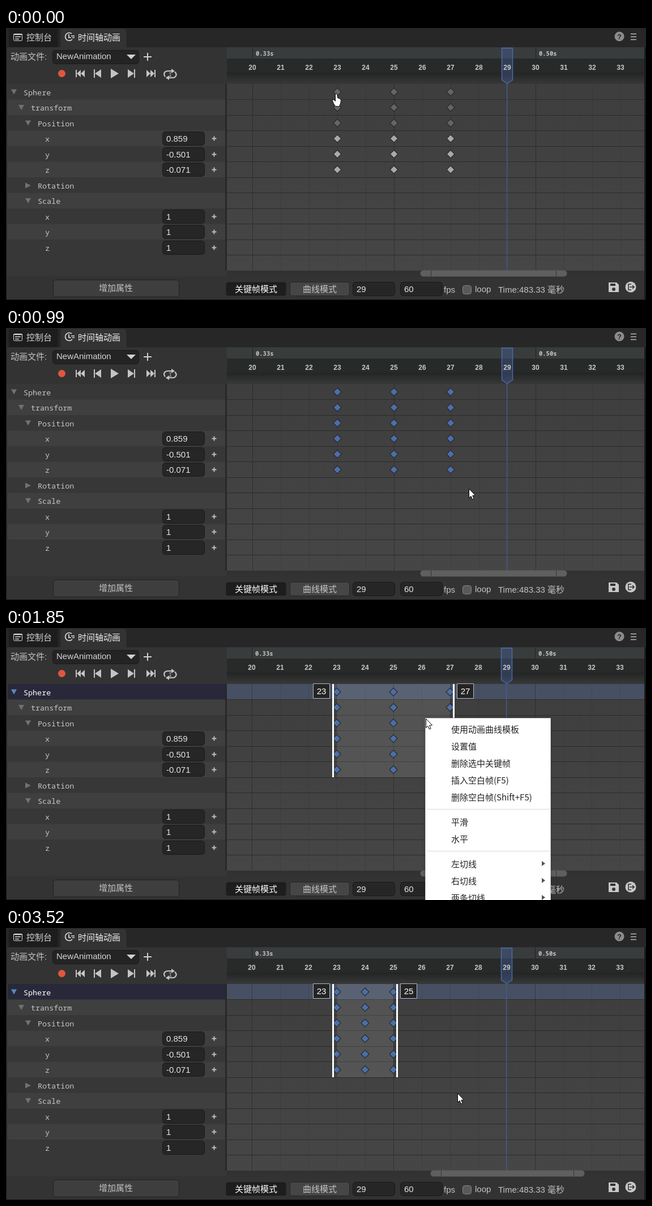
Animation of 1130 by 481 pixels, one loop 4450 ms. Source, as an HTML page with a canvas:

```html
<!DOCTYPE html>
<html lang="zh">
<head>
<meta charset="utf-8">
<title>时间轴动画</title>
<style>
html, body { margin: 0; width: 100%; height: 100%; overflow: hidden; background: #272727; }
canvas { display: block; }
</style>
</head>
<body>
<canvas id="stage" width="1130" height="481"></canvas>
<script>
const ctx = document.getElementById('stage').getContext('2d');
const LOOP = 4450;
const SANS = '"Liberation Sans", "Noto Sans CJK SC", "Noto Sans CJK", sans-serif';
const CJK = '"Noto Sans CJK SC", "Noto Sans CJK", sans-serif';
const MONO = '"Noto Sans Mono", monospace';

const SELECT = 1220, MENU_OPEN = 1850, MENU_CLOSE = 3450, SHORTEN = 3520;
const DRAG_START = 540, DRAG_END = 990;
const ROW = 27.5, TOP = 99;

// [time, x, y] of the pointer tip; it holds each place until the next one
const pointerSteps = [
  [0, 582, 116], [70, 575, 114], [150, 562, 109], [220, 549, 105], [300, 545, 104],
  [540, 553, 109], [620, 598, 139], [700, 670, 188], [770, 735, 231],
  [840, 767, 252], [920, 813, 280], [990, 817, 284],
  [1300, 806, 266], [1380, 776, 218], [1460, 748, 173], [1540, 741, 160],
  [2800, 764, 223], [2880, 774, 243], [2960, 782, 259], [3040, 788, 273],
  [3120, 793, 284], [3200, 796, 290], [3280, 797, 292]
];
// [from, to, opacity]
const clicks = [[460, 990, .55], [1770, 1850, .55], [3370, 3450, .72]];

const rows = [
  ['Sphere', 31, 'open'], ['transform', 44, 'open'], ['Position', 56, 'open'],
  ['x', 69, '0.859'], ['y', 69, '-0.501'], ['z', 69, '-0.071'],
  ['Rotation', 56, 'closed'], ['Scale', 56, 'open'],
  ['x', 69, '1'], ['y', 69, '1'], ['z', 69, '1']
];
const menuItems = [
  ['使用动画曲线模板', 180], ['设置值', 210], ['删除选中关键帧', 240],
  ['插入空白帧(F5)', 270], ['删除空白帧(Shift+F5)', 300],
  ['平滑', 344], ['水平', 374],
  ['左切线', 418, true], ['右切线', 448, true], ['两条切线', 478, true]
];

function rect(x, y, w, h, fill) {
  ctx.fillStyle = fill;
  ctx.fillRect(x, y, w, h);
}

function box(x, y, w, h, radius, fill, stroke) {
  ctx.beginPath();
  ctx.roundRect(x + .5, y + .5, w - 1, h - 1, radius);
  ctx.fillStyle = fill;
  ctx.fill();
  if (stroke) outline(stroke, 1);
}

function outline(color, width) {
  ctx.strokeStyle = color;
  ctx.lineWidth = width;
  ctx.stroke();
}

function poly(points, fill, stroke, width = 1) {
  ctx.beginPath();
  for (let i = 0; i < points.length; i += 2) ctx.lineTo(points[i], points[i + 1]);
  ctx.closePath();
  if (fill) { ctx.fillStyle = fill; ctx.fill(); }
  if (stroke) outline(stroke, width);
}

function path(d, color, width) {
  ctx.strokeStyle = color;
  ctx.lineWidth = width;
  ctx.stroke(new Path2D(d));
}

function disc(x, y, r, fill) {
  ctx.beginPath();
  ctx.arc(x, y, r, 0, 7);
  ctx.fillStyle = fill;
  ctx.fill();
}

function text(str, x, baseline, color, font = '15px ' + SANS, align = 'left') {
  ctx.font = font;
  ctx.textAlign = align;
  ctx.fillStyle = color;
  ctx.fillText(str, x, baseline);
}

function plus(x, y, r, width, color) {
  path(`M${x - r} ${y}h${2 * r}M${x} ${y - r}v${2 * r}`, color, width);
}

function field(x, y, value) {
  box(x, y, 75, 25, 5, '#262626', '#191919');
  text(value, x + 7, y + 18, '#e4e4e4');
}

function drawTabs() {
  rect(0, 0, 1130, 481, '#272727');
  rect(5, 1, 87, 33, '#1d1d1d');
  box(96, 1, 117, 38, 5, '#333');
  box(13, 10, 16, 13, 2, '#1d1d1d', '#ddd');
  path('M13 11.5h16M16 15.5h10M16 19.5h7', '#ddd', 1.6);
  text('控制台', 36, 22, '#d2d2d2');
  path('M116 10A7 7 0 1 0 117 20M111 11v6h4M115 14h6M117 17h4', '#ddd', 1.7);
  text('时间轴动画', 127, 22, '#eee');
  disc(1083, 15, 8.5, '#8c8c8c');
  text('?', 1083, 20, '#272727', `bold 13px ${SANS}`, 'center');
  path('M1103 10.5h10M1103 15.5h10M1103 20.5h10', '#bbb', 1.5);
}

function drawToolbar() {
  rect(0, 34, 390, 66, '#333');
  text('动画文件:', 8, 56, '#c4c4c4');
  box(82, 39, 153, 25, 5, '#242424', '#191919');
  text('NewAnimation', 89, 55, '#d4d4d4');
  poly([213, 47, 229, 47, 221, 55], '#d0d0d0');
  plus(250, 51, 7, 2, '#d0d0d0');
  disc(98.5, 80.5, 6.5, '#e0563f');
  const icon = '#c4c4c4';
  rect(123, 74, 2, 13, icon);
  poly([132, 74, 132, 87, 125, 80.5], icon);
  poly([139, 74, 139, 87, 132, 80.5], icon);
  rect(155, 73, 2, 15, icon);
  poly([168, 73, 168, 88, 157, 80.5], icon);
  poly([185, 72, 185, 89, 199, 80.5], icon);
  poly([215, 73, 215, 88, 226, 80.5], icon);
  rect(226, 73, 2, 15, icon);
  poly([248, 74, 248, 87, 255, 80.5], icon);
  poly([255, 74, 255, 87, 262, 80.5], icon);
  rect(262, 74, 2, 13, icon);
  path('M281 86C277 81 280 76 286 76H293M298 77.500C303 82 300 88 294 88H287', icon, 2.2);
  poly([292, 72, 298, 76, 292, 80], icon);
  poly([288, 84, 282, 88, 288, 92], icon);
  text('1', 290, 86, icon, `10px ${SANS}`, 'center');
}

function drawTree(selected) {
  rect(0, 99, 390, 340, '#373737');
  rows.forEach(([label, x, kind], i) => {
    const y = TOP + ROW * i, mid = y + 14.5, active = selected && i === 0;
    rect(3, y, 384, ROW, active ? '#28283a' : i % 2 ? '#3f3f3f' : '#373737');
    text(label, x, mid + 5, active ? '#fff' : '#c6c6c6', `${active ? 500 : 400} 13.4px ${MONO}`);
    const arrow = active ? '#5f87b8' : '#717171', ax = x - 17;
    if (kind === 'open') poly([ax - 5, mid - 5, ax + 5, mid - 5, ax, mid + 4], arrow);
    else if (kind === 'closed') poly([ax - 5, mid - 5, ax + 5, mid, ax - 5, mid + 5], arrow);
    else {
      field(276, Math.round(mid) - 13, kind);
      plus(367.5, Math.round(mid) - .5, 4, 2, '#bdbdbd');
    }
  });
  rect(387, 99, 3, 330, '#282828');
}

function drawRuler(shift) {
  rect(390, 34, 737, 20, '#393c3c');
  rect(390, 54, 737, 26, '#272a29');
  const fade = ctx.createLinearGradient(0, 78, 0, 99);
  fade.addColorStop(0, '#222323');
  fade.addColorStop(1, '#383838');
  rect(390, 79, 737, 20, fade);
  [['0.33s', 435], ['0.50s', 935]].forEach(([label, x]) => {
    rect(x - shift, 34, 1, 20, '#222');
    text(label, x + 6 - shift, 49, '#c4c4c4', `bold 10.5px ${MONO}`);
  });
}

function drawGrid(shift, selected) {
  const shade = ctx.createLinearGradient(0, 99, 0, 429);
  shade.addColorStop(0, '#3e3e3e');
  shade.addColorStop(1, '#464646');
  rect(390, 99, 737, 330, shade);
  if (selected) rect(390, 99, 737, 27, '#465062');
  for (let f = 20; f <= 33; f++) {
    rect(frameX(f) - shift, 99, 1, 330, f % 5 ? 'rgba(0,0,0,.09)' : 'rgba(0,0,0,.28)');
  }
  for (let i = 1; i <= 12; i++) rect(390, Math.floor(TOP + ROW * i), 737, 1, '#2b2b2b');
}

function frameX(frame) {
  return 435 + (frame - 20) * 50;
}

function drawPlayhead(shift) {
  const x = frameX(29) - shift;
  rect(x - 1, 99, 1.5, 330, '#465d8d');
  poly([x - 9.5, 35.5, x + 9.5, 35.5, x + 9.5, 92, x, 98.5, x - 9.5, 92],
    'rgba(70,100,165,.35)', '#4c6cb0', 1.4);
  for (let f = 20; f <= 33; f++) {
    text(f, frameX(f) - shift, 74, '#c8c8c8', `bold 12px ${SANS}`, 'center');
  }
}

function drawKeys(t, shift, pointer) {
  const frames = t >= SHORTEN ? [23, 24, 25] : [23, 25, 27];
  const selected = t >= SELECT;
  const left = frameX(frames[0]) - shift, right = frameX(frames[2]) - shift;
  const dragging = t >= DRAG_START && t < DRAG_END;
  const dragX = Math.max(546, pointer[1] - 14), dragY = Math.max(105, pointer[2] - 9);
  if (selected) rect(left, 99, right - left, 165, 'rgba(255,255,255,.1)');
  for (const f of frames) {
    for (let i = 0; i < 6; i++) {
      const x = frameX(f) - shift, y = 113 + ROW * i;
      const picked = t >= DRAG_END || dragging && x - 8 < dragX && y - 8 < dragY;
      poly([x, y - 7, x + 7, y, x, y + 7, x - 7, y],
        picked ? '#4c6fa8' : i < 3 ? '#656565' : '#a9a9a9', '#272a30', 1.2);
    }
  }
  if (dragging) {
    rect(544, 103, dragX - 544, dragY - 103, 'rgba(90,115,155,.3)');
    ctx.strokeStyle = '#5a7299';
    ctx.lineWidth = 2;
    ctx.strokeRect(545, 104, dragX - 545, dragY - 104);
  }
  if (selected) {
    rect(left - 8, 99, 3, 165, '#fff');
    rect(right + 5, 99, 3, 165, '#fff');
    [[frames[0], left - 42], [frames[2], right + 12]].forEach(([label, x]) => {
      box(x, 98, 30, 27, 0, '#242424', '#b4b8bc');
      text(label, x + 15, 117, '#fff', undefined, 'center');
    });
  }
}

function drawFooter(shortened) {
  rect(0, 439, 1130, 42, '#333');
  rect(390, 429, 737, 11, '#323232');
  const [x, w] = shortened ? [749, 273] : [731, 260];
  box(x, 428, w, 12, 6, '#5f5f5f');
  rect(x + 19, 429, 1, 10, '#333');
  rect(x + w - 20, 429, 1, 10, '#333');
  box(83, 445, 223, 31, 4, '#3e3e3e', '#202020');
  text('增加属性', 164, 465, '#c4c4c4');
  box(388, 449, 107, 25, 4, '#1d1d1d');
  text('关键帧模式', 404, 467, '#fff');
  box(501, 449, 106, 25, 4, '#464646', '#262626');
  text('曲线模式', 524, 467, '#c4c4c4');
  field(612, 449, '29');
  field(696, 449, '60');
  text('fps', 773, 468, '#c4c4c4');
  box(806, 455, 16, 16, 4, '#5a5a5a', '#858585');
  text('loop', 828, 467, '#c4c4c4');
  text('Time:483.33 毫秒', 869, 468, '#c4c4c4');
  poly([1064, 450, 1078, 450, 1082, 454, 1082, 467, 1064, 467], '#c8c8c8');
  rect(1067, 452, 9, 4, '#333');
  disc(1073, 462, 3, '#333');
  disc(1103, 458, 9.5, '#c8c8c8');
  path('M1104 453h-5v10h5M1101 458h8M1106 455l3 3l-3 3', '#333', 1.6);
  rect(0, 34, 1, 447, '#171717');
  rect(1127, 34, 3, 447, '#1a1a1a');
  rect(0, 480, 1130, 1, '#171414');
}

function drawMenu(pointerY) {
  ctx.save();
  ctx.shadowColor = 'rgba(0,0,0,.4)';
  ctx.shadowBlur = 4;
  rect(740, 159, 222, 330, '#fff');
  ctx.restore();
  ctx.strokeStyle = '#c8c8c8';
  ctx.lineWidth = 1;
  ctx.strokeRect(740.5, 159.5, 221, 330);
  const hot = Math.floor((pointerY - 164) / 30);
  if (hot >= 0) rect(742, 164 + 30 * hot, 219, 30, '#e6e6e6');
  menuItems.forEach(([label, y, submenu]) => {
    text(label, 786, y + 5, '#222', '15px ' + CJK);
    if (submenu) poly([946, y - 6, 952, y - 1.5, 946, y + 3], '#555');
  });
  rect(743, 320, 217, 1, '#d8d8d8');
  rect(743, 394, 217, 1, '#d8d8d8');
}

function drawPointer(t, x, y) {
  const click = clicks.find(([from, to]) => t >= from && t < to);
  if (click) disc(x - .5, y + 1, 12, `rgba(255,250,0,${click[2]})`);
  ctx.save();
  ctx.translate(x + .5, y + .5);
  ctx.lineJoin = 'round';
  if (t < 150) {
    poly([-1, 0, 2, 0, 3, 7, 8, 9, 9, 12, 8, 17, 6, 22, -1, 22, -4, 17, -6, 12, -4, 10, -1, 13], '#fff', '#111');
  } else {
    poly([0, 0, 0, 16, 3.5, 12.8, 6, 18.5, 8.6, 17.4, 6.2, 11.8, 11, 11.4], '#fff', '#000');
  }
  ctx.restore();
}

function draw(t) {
  const pointer = pointerSteps.findLast(step => step[0] <= t);
  const shift = t >= MENU_OPEN ? 1 : 0;
  const selected = t >= SELECT;
  drawTabs();
  drawToolbar();
  drawTree(selected);
  drawRuler(shift);
  drawGrid(shift, selected);
  drawPlayhead(shift);
  drawKeys(t, shift, pointer);
  drawFooter(t >= SHORTEN);
  if (t >= MENU_OPEN && t < MENU_CLOSE) drawMenu(pointer[2]);
  drawPointer(t, pointer[1], pointer[2]);
}

const start = performance.now();
function tick() {
  draw((performance.now() - start) % LOOP);
  requestAnimationFrame(tick);
}
tick();
</script>
</body>
</html>
```
